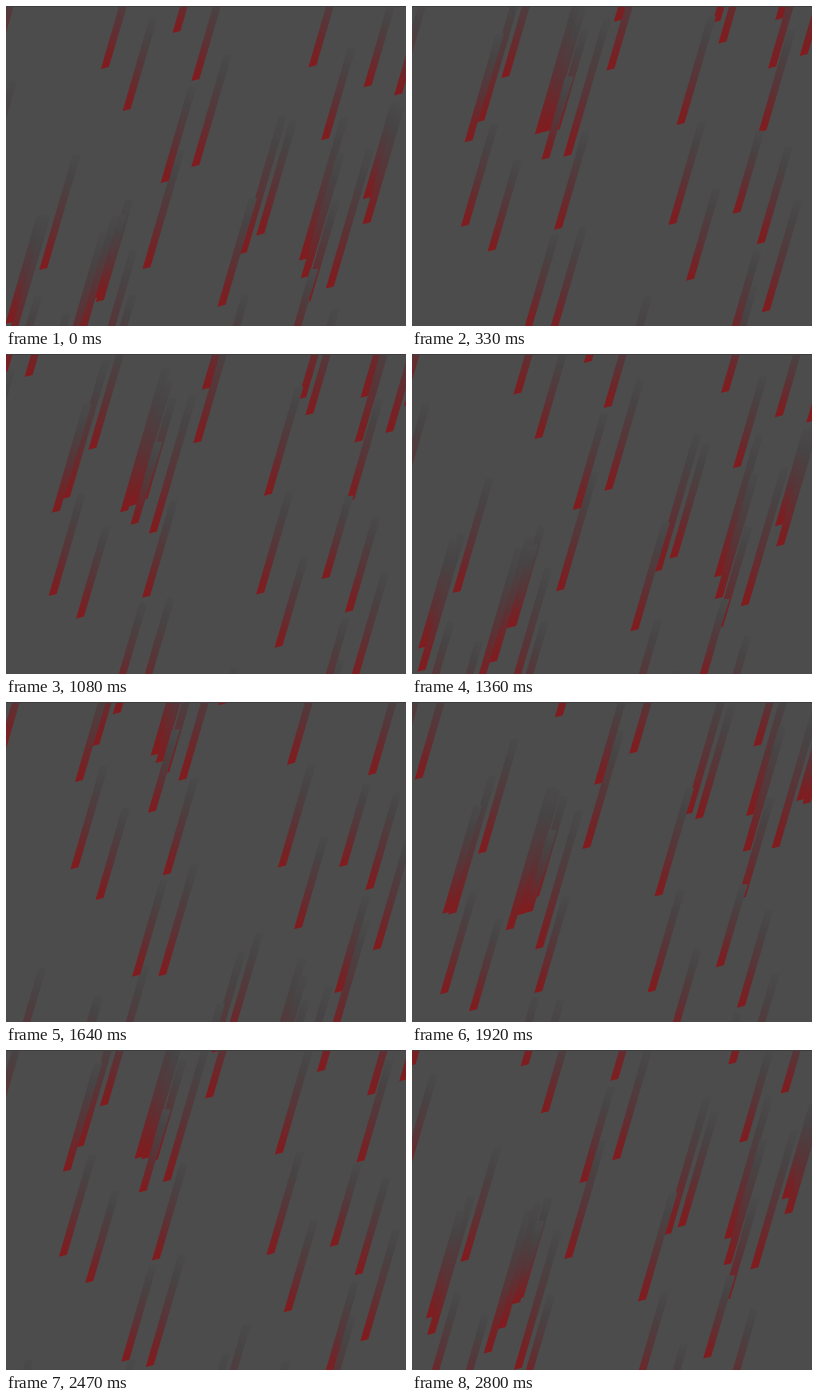
Animation of 400x320 px, one loop 2.85 s. Source, as an HTML page with a canvas:

```html
<!DOCTYPE html>
<html lang="en">
<head>
<meta charset="utf-8">
<title>Red rain</title>
<style>
  html, body { margin: 0; width: 100%; height: 100%; overflow: hidden; background: #4c4c4c; }
  canvas { display: block; }
</style>
</head>
<body>
<canvas id="stage" width="400" height="320"></canvas>
<script>
const WIDTH = 400, HEIGHT = 320;
const LOOP = 2850, STEPS = 62;
const SLANT = 0.292;      // leftward drift per pixel of fall
const TRAIL = 0.31;       // trail length as a share of the spacing
const HALF_WIDTH = 4;
const BAND_PITCH = 207;   // the pattern repeats sideways at this distance
const LEVEL_SPACING = 328, BAND_SHEAR = 0.86;

// Streams of one band: x where the path meets the top edge, tip y at the start,
// spacing between drops. A stream falls one spacing per cycle, so wide means fast.
const streams = [
  [96, 317, 348], [102, 347, 444], [114, 263, 368], [117, 62, 330],
  [151, 104, 294], [164, 368, 461], [171, 335, 402], [178, 26, 265],
  [180, 295, 327], [199, 382, 445], [210, 176, 309], [211, 74, 311],
  [217, 262, 380], [236, 160, 358]
].sort((a, b) => b[2] - a[2]);

const ctx = document.getElementById("stage").getContext("2d");

// The fall slows slightly over the loop and advances in discrete steps.
function cyclesAt(time) {
  const step = Math.floor(time / LOOP * STEPS);
  return step * (0.0688 - 0.000075 * step);
}

function drawDrop(x, y, length) {
  const topX = x + length * SLANT, topY = y - length;
  const paint = ctx.createLinearGradient(x + length * 0.45, topY, x, y);
  paint.addColorStop(0, "#4c4c4c");
  paint.addColorStop(0.25, "#474445");
  paint.addColorStop(0.6, "#593437");
  paint.addColorStop(0.85, "#742326");
  paint.addColorStop(1, "#821b1e");
  ctx.fillStyle = paint;
  ctx.beginPath();
  ctx.moveTo(topX - HALF_WIDTH, topY);
  ctx.lineTo(topX + HALF_WIDTH, topY);
  ctx.lineTo(x + HALF_WIDTH, y - 1);
  ctx.lineTo(x - HALF_WIDTH, y + 1);
  ctx.fill();
}

function drawStream(topX, startY, spacing, phase) {
  const length = spacing * TRAIL;
  for (let copy = -2; copy <= 1; copy++) {
    const y = startY + spacing * (phase + copy);
    if (y > -2 && y - length < HEIGHT) drawDrop(topX - y * SLANT, y, length);
  }
}

function draw(time) {
  const phase = cyclesAt(time) % 1;
  ctx.fillStyle = "#4c4c4c";
  ctx.fillRect(0, 0, WIDTH, HEIGHT);
  for (const [x, y, spacing] of streams) {
    const shear = BAND_SHEAR * (LEVEL_SPACING - spacing);
    for (let band = -1; band <= 1; band++) {
      drawStream(x + band * BAND_PITCH, y + band * shear, spacing, phase);
    }
  }
  ctx.fillStyle = "#3e3c3c";
  ctx.fillRect(0, 0, WIDTH, 1);
}

function tick() {
  draw(performance.now() % LOOP);
  requestAnimationFrame(tick);
}
tick();
</script>
</body>
</html>
```
